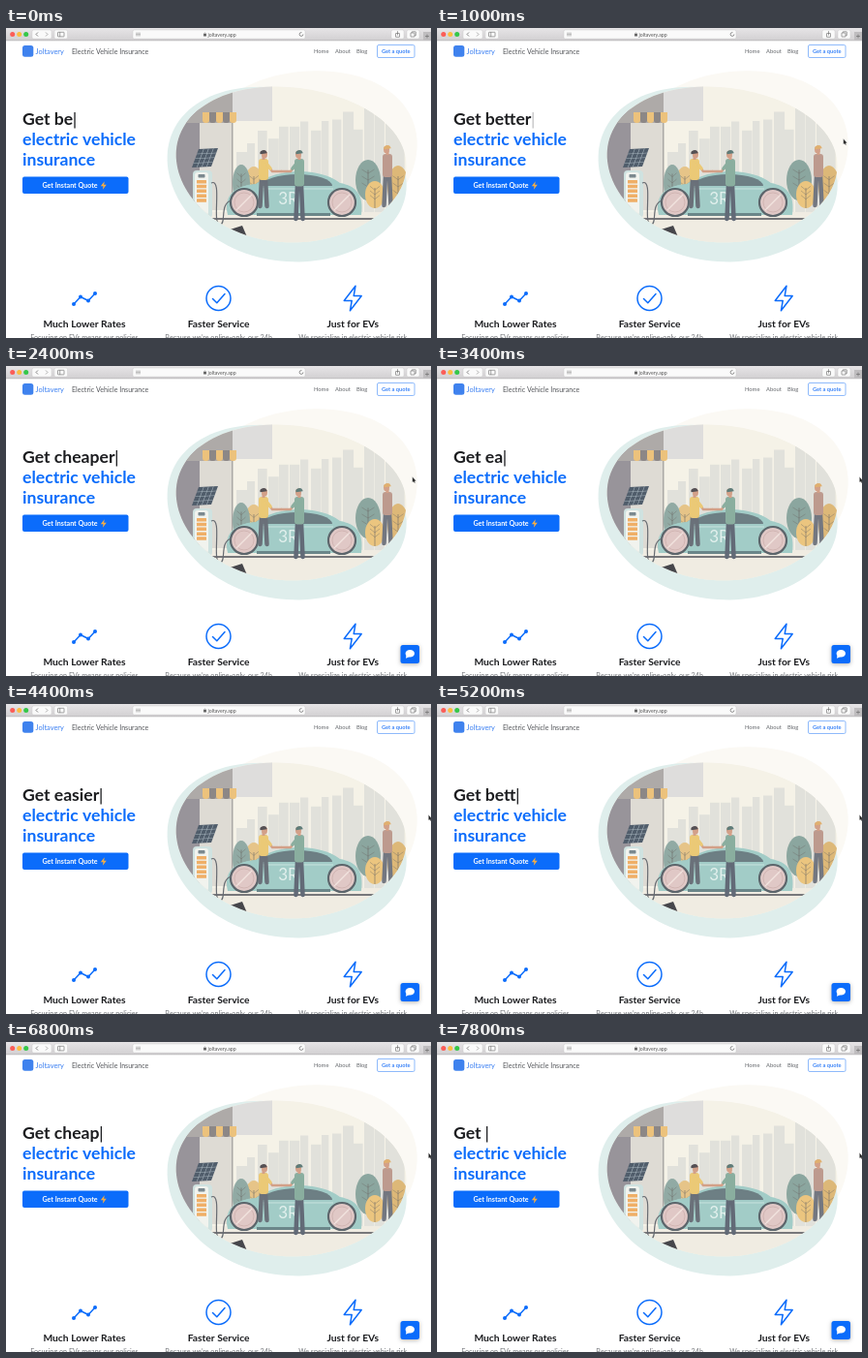
Animation of 439x320 px, one loop 8 s. Source, as an HTML page with a canvas:

```html
<!DOCTYPE html>
<html lang="en">
<head>
<meta charset="utf-8">
<title>Electric Vehicle Insurance</title>
<style>
html, body { margin: 0; width: 100%; height: 100%; overflow: hidden; background: #fff; }
canvas { display: block; width: 439px; height: 320px; }
</style>
</head>
<body>
<canvas id="stage"></canvas>
<script>
const W = 439, H = 320, LOOP = 8000, STEP = 200;
const BLUE = '#0b6cfb', INK = '#1c1d20', GREY = '#666', SKIN = '#d3a088';
const WORDS = ['better', 'cheaper', 'easier'];
const TYPE = 140, HOLD = 635, ERASE = 12, GAP = 10, FIRST = -284;
const canvas = document.getElementById('stage');
const c = canvas.getContext('2d');
const ratio = window.devicePixelRatio || 1;
canvas.width = W * ratio;
canvas.height = H * ratio;

function paint(fill, stroke, lw = 1) {
  if (fill) { c.fillStyle = fill; c.fill(); }
  if (stroke) { c.strokeStyle = stroke; c.lineWidth = lw; c.stroke(); }
}

function box(x, y, w, h, fill, r = 0, stroke, lw) {
  c.beginPath();
  c.roundRect(x, y, w, h, r);
  paint(fill, stroke, lw);
}

function oval(x, y, rx, ry, fill, stroke, lw, from = 0, to = Math.PI * 2) {
  c.beginPath();
  c.ellipse(x, y, rx, ry, 0, from, to);
  paint(fill, stroke, lw);
}

function shape(p, fill, stroke, lw) {
  c.beginPath();
  for (let i = 0; i < p.length; i += 2) c.lineTo(p[i], p[i + 1]);
  if (fill) c.closePath();
  paint(fill, stroke, lw);
}

const line = (p, color, lw = 1) => shape(p, null, color, lw);

// tilted ellipse with a three-fold wobble
function blob(x, y, rx, ry, tilt, wobble) {
  c.beginPath();
  for (let a = 0; a < Math.PI * 2; a += 0.05) {
    const r = 1 + wobble * Math.cos(3 * a + 1);
    const u = rx * r * Math.cos(a), v = ry * r * Math.sin(a);
    c.lineTo(x + u * Math.cos(tilt) - v * Math.sin(tilt), y + u * Math.sin(tilt) + v * Math.cos(tilt));
  }
  c.closePath();
}

function text(s, x, y, size, color, weight = 400, align = 'left') {
  c.font = `${weight} ${size}px Lato, sans-serif`;
  c.textAlign = align;
  c.fillStyle = color;
  c.fillText(s, x, y);
}

function chevron(x, dir, color) {
  line([x - dir, 4.5, x + dir, 6.5, x - dir, 8.5], color, 0.8);
}

function browserBar() {
  const g = c.createLinearGradient(0, 0, 0, 13);
  g.addColorStop(0, '#e6e4e6');
  g.addColorStop(1, '#d2d0d2');
  box(0, 0, W, 13, g);
  box(0, 12.5, W, 0.8, '#b5b3b5');
  const button = (x, w) => box(x, 2, w, 9, '#fafafa', 1.5, '#c4c4c4', 0.4);
  ['#fb5d57', '#fcbd3f', '#35c749'].forEach((col, i) => oval(6.7 + i * 7, 6.5, 2.5, 2.5, col));
  button(27, 20);
  chevron(32, -1, GREY);
  chevron(42, 1, '#999');
  button(50, 13.5);
  box(53.5, 4.3, 6.5, 4.6, null, 0.5, GREY, 0.6);
  line([55.7, 4.3, 55.7, 8.9], GREY, 0.6);
  button(131, 178);
  for (let i = 0; i < 3; i++) box(134, 4.8 + i * 1.4, 5, 0.6, '#999');
  box(204, 6, 3, 2.5, GREY, 0.3);
  oval(205.5, 6, 1, 1, null, GREY, 0.5, Math.PI, 0);
  text('joltavery.app', 208.5, 8.5, 5.2, '#555');
  oval(305, 6.5, 1.9, 1.9, null, GREY, 0.7, 0, 5);
  button(398, 13);
  box(402.5, 5.5, 4, 3.8, null, 0.3, GREY, 0.6);
  line([404.5, 7.5, 404.5, 3.2], GREY, 0.6);
  button(414, 13);
  box(419.3, 3.8, 4, 4, null, 0.3, GREY, 0.6);
  box(418, 5, 4, 4, '#fafafa', 0.3, GREY, 0.6);
  box(431, 4, 8, 9, '#bfbdbf');
  line([433, 8.5, 437, 8.5], GREY, 0.6);
  line([435, 6.5, 435, 10.5], GREY, 0.6);
}

function header() {
  box(17, 18, 11.3, 11.8, '#3f82ee', 2.5);
  text('Joltavery', 30.5, 26.7, 7.4, '#3a7ff2');
  text('Electric Vehicle Insurance', 68, 26.7, 7.1, '#55575b');
  ['Home', 'About', 'Blog'].forEach((s, i) => text(s, 318 + i * 22, 26, 5.8, '#63666a'));
  box(383.5, 17.5, 38.5, 13, '#fff', 1.5, '#73a9fa', 0.8);
  text('Get a quote', 402.7, 26, 5.7, '#3b84f8', 700, 'center');
}

function bush(x, y, rx, ry, color) {
  oval(x, y, rx, ry, color);
  line([x, y - ry / 2, x, y + ry], '#6d6b66', 0.6);
  for (let k = y - ry / 3; k < y + ry / 2; k += ry / 3) {
    line([x - rx / 2, k - 4, x, k, x + rx / 2, k - 4], '#6d6b66', 0.4);
  }
}

// dir is the side the figure faces
function person(x, top, height, dir, shirt, pants, hair) {
  const foot = top + height, hip = top + height * 0.5;
  c.lineCap = c.lineJoin = 'round';
  line([x - 3.5, foot, x - 2, hip, x + 2, hip, x + 3.5, foot], pants, 4.5);
  box(x - 5, top + 9, 10, hip - top - 7, shirt, 3);
  box(x - 1.5, top + 6, 3, 4, SKIN);
  oval(x + dir, top + 4.5, 3, 4, SKIN);
  oval(x, top + 3.3, 3.6, 3.3, hair, null, 0, Math.PI * 0.9, Math.PI * 2);
  c.lineCap = 'butt';
  c.lineJoin = 'miter';
}

function handshake(left, right, y, cuffLeft, cuffRight) {
  const mid = (left + right) / 2;
  c.lineCap = 'round';
  [[left, 1, cuffLeft], [right, -1, cuffRight]].forEach(([x, dir, cuff]) => {
    line([x + 3 * dir, y, x + 9 * dir, y + 8, mid, y + 8], SKIN, 2.3);
    line([x + 3 * dir, y, x + 7 * dir, y + 5], cuff, 3.6);
  });
  c.lineCap = 'butt';
}

function wheel(x, y) {
  oval(x, y, 14, 14, '#e0c8c6', '#5c656b', 2.2);
  oval(x, y, 10, 10, null, '#cdb0ae', 0.8);
  line([x - 8, y + 8, x + 8, y - 8], '#f2e3df', 1.3);
}

function car() {
  c.beginPath();
  c.moveTo(229, 193);
  c.bezierCurveTo(224, 170, 240, 162, 258, 161);
  c.bezierCurveTo(280, 145, 322, 143, 345, 160);
  c.bezierCurveTo(361, 163, 370, 171, 367, 193);
  c.closePath();
  paint('#a2ccc7');
  oval(301, 163, 36, 12, '#6d7f84', null, 0, Math.PI, 0);
  line([303, 163, 306, 193], '#88b0ad', 0.7);
  line([262, 166, 338, 166], '#c8e2de');
  box(259, 191, 76, 3, '#6b8689');
  text('3R', 291.5, 181.5, 17, '#e2f0ed', 400, 'center');
  wheel(246, 180);
  wheel(347, 180);
}

function charger() {
  c.save();
  c.transform(20, -1, -7, 19, 199, 125);
  box(0, 0, 1, 1, '#505d6b');
  for (let i = 1; i < 4; i++) {
    box(i / 4, 0, 0.03, 1, '#a7b4bd');
    box(0, i / 4, 1, 0.03, '#a7b4bd');
  }
  c.restore();
  box(193, 147, 20, 49, '#cfe2e0', 4);
  box(195, 149, 14, 44, '#f1f3ee', 3);
  for (let y = 157; y < 180; y += 4.8) box(197, y, 10, 3.5, '#efaf67', 0.5);
  box(198.5, 151, 7, 3.5, '#7b898f', 0.7);
  c.beginPath();
  c.moveTo(212, 160);
  c.bezierCurveTo(224, 154, 212, 203, 221, 203);
  c.bezierCurveTo(228, 203, 220, 181, 233, 178);
  paint(null, '#666b71', 1.2);
}

function skyline() {
  let seed = 7;
  const rand = () => (seed = seed * 16807 % 2147483647) / 2147483647;
  for (let x = 238; x < 412; x += 11) {
    const top = 128 - (x - 238) / 6 - rand() * 25;
    box(x, top, 7 + rand() * 5, 190 - top, '#e1e1db');
  }
}

function station() {
  box(170, 60, 30, 135, '#98949a');
  box(200, 98, 34, 90, '#dedbd4');
  box(186, 60, 48, 38, '#aeaaa8');
  box(234, 60, 41, 36, '#dedddc');
  for (let i = 0; i < 5; i++) box(203 + i * 7, 87, 7, 11, i % 2 ? '#8c8786' : '#ecc27c', [0, 0, 3, 3]);
  box(233, 98, 1.5, 92, '#aaa8a5');
}

function scene() {
  c.save();
  blob(293, 140, 119, 80, 0.08, 0.02);
  c.clip();
  box(160, 50, 270, 180, '#f5f2e7');
  skyline();
  station();
  bush(256, 163, 10, 20, '#e6c488');
  bush(243, 160, 9, 19, '#91aaa4');
  bush(374, 157, 13, 21, '#8ba69f');
  bush(381, 172, 10, 14, '#ebc57f');
  bush(405, 164, 11, 22, '#ddb878');
  box(160, 190, 260, 40, '#f0ece2');
  line([176, 197, 385, 197], '#77777a', 2);
  shape([203, 217, 244, 204, 250, 218], '#46464b');
  person(394, 121, 62, -1, '#bd9a8e', '#737780', '#e0b070');
  car();
  charger();
  person(266, 126, 58, 1, '#ebc976', '#6a7079', '#545054');
  person(303, 126, 71, -1, '#8aae9f', '#626a77', '#5f7c79');
  handshake(266, 303, 140, '#ebc976', '#8aae9f');
  c.restore();
}

function illustration() {
  blob(309, 135, 116, 92, -0.2, 0.025);
  paint('#fbf9f4');
  blob(288, 151, 125, 88, 0.22, 0.02);
  paint('#dfeeec');
  scene();
}

// finds the word being typed and how much of it stands
function typing(t) {
  let start = FIRST, i = 0;
  for (;;) {
    const word = WORDS[i++ % WORDS.length];
    const full = start + word.length * TYPE, leave = full + HOLD;
    const next = leave + word.length * ERASE + GAP;
    if (t < next) {
      const shown = t < leave ? Math.floor((t - start) / TYPE) : word.length - Math.floor((t - leave) / ERASE);
      return { part: word.slice(0, Math.max(0, shown)), rest: t < leave ? t - full : 0 };
    }
    start = next;
  }
}

function heading(t) {
  const { part, rest } = typing(t);
  const first = 'Get ' + part;
  text(first, 17, 100.3, 17.6, INK, 700);
  const end = 17 + c.measureText(first).width;
  const blink = Math.min(1, Math.abs(rest - 400) / 180);
  c.globalAlpha = 1 - 0.85 * Math.cos(blink * Math.PI / 2) ** 2;
  box(end + 1.2, 87, 1.3, 16.5, INK);
  c.globalAlpha = 1;
  text('electric vehicle', 17, 121.3, 17.6, BLUE, 700);
  text('insurance', 17, 142.4, 17.6, BLUE, 700);
  box(17, 153.5, 109.5, 17.5, BLUE, 2);
  text('Get Instant Quote', 37.5, 165, 7.1, '#fff', 700);
  bolt(100.8, 162.5, 0.33);
  paint('#f6ad43');
}

function bolt(x, y, k) {
  c.beginPath();
  for (const s of [1, -1]) {
    c.lineTo(x + 2.8 * k * s, y - 12.8 * k * s);
    c.lineTo(x - 9 * k * s, y + 2.5 * k * s);
    c.lineTo(x - k * s, y + 2.5 * k * s);
  }
  c.closePath();
}

function features() {
  c.lineCap = c.lineJoin = 'round';
  const dots = [70, 285, 77, 277.5, 85, 281.5, 92, 274];
  line(dots, BLUE, 1.5);
  for (let i = 0; i < 8; i += 2) oval(dots[i], dots[i + 1], 2, 2, BLUE);
  oval(219.5, 279, 12.5, 12.5, null, BLUE, 1.5);
  line([213.5, 279.5, 217.8, 283.7, 226, 274.5], BLUE, 1.5);
  bolt(358.2, 279, 1);
  paint(null, BLUE, 1.5);
  c.lineCap = 'butt';
  c.lineJoin = 'miter';
  [['Much Lower Rates', 'Focusing on EVs means our policies'],
   ['Faster Service', 'Because we’re online-only, our 24h'],
   ['Just for EVs', 'We specialize in electric vehicle risk']]
    .forEach(([title, body], i) => {
      const x = 81 + i * 138.6;
      text(title, x, 309.3, 10.3, INK, 700, 'center');
      text(body, x, 321.8, 7.2, '#74777b', 400, 'center');
    });
}

function chatButton() {
  c.save();
  c.shadowColor = 'rgba(0,0,0,.3)';
  c.shadowBlur = 4 * ratio;
  c.shadowOffsetY = ratio;
  box(407.5, 288, 19.5, 19, BLUE, 2.5);
  c.restore();
  oval(417.3, 296.8, 4.7, 3.8, '#fff');
  shape([413.6, 298, 413, 301.7, 417, 300], '#fff');
}

function pointer(t) {
  const p = Math.min(1, Math.max(0, (t - 2400) / 800));
  const x = 419.7 + 16.6 * p * p * (3 - 2 * p), y = 114.3;
  shape([x, y, x, y + 5.7, x + 3.9, y + 4.1], '#222', '#fff', 0.4);
  line([x + 1.5, y + 4, x + 2.5, y + 6.3], '#222', 0.9);
}

function draw(t) {
  c.setTransform(ratio, 0, 0, ratio, 0, 0);
  box(0, 0, W, H, '#fff');
  browserBar();
  header();
  illustration();
  heading(t);
  features();
  if (t >= 1400) chatButton();
  if (t >= 400) pointer(t);
}

const begin = performance.now();
function tick() {
  const t = (performance.now() - begin) % LOOP;
  draw(Math.floor(t / STEP) * STEP);
  requestAnimationFrame(tick);
}
tick();
</script>
</body>
</html>
```
